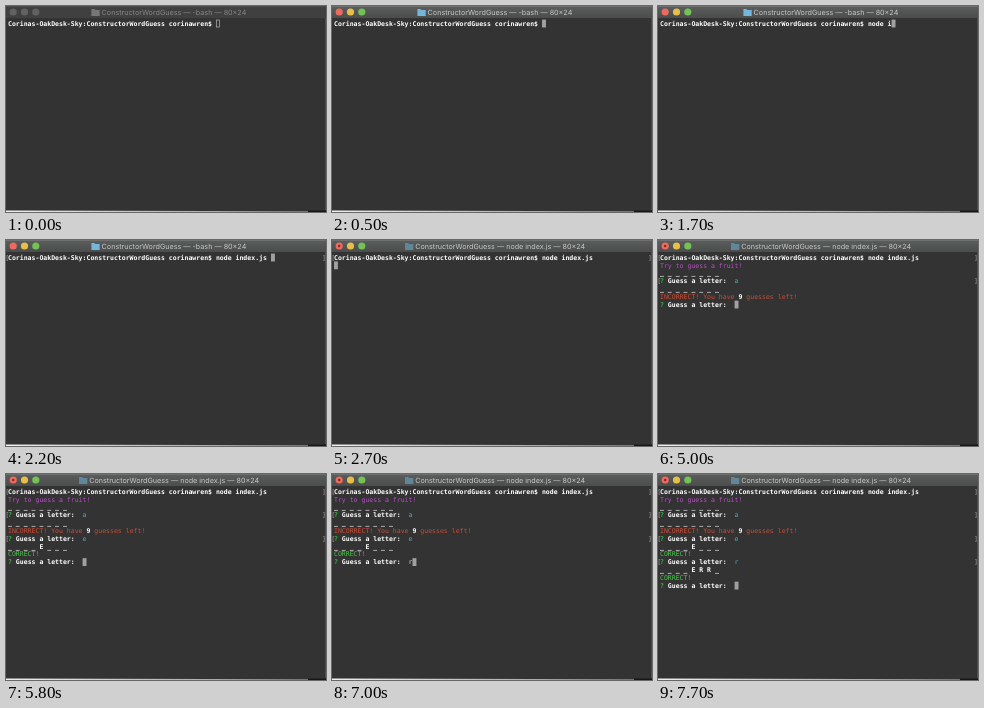
Animation, 320 px wide and 206 px high, one loop 8000 ms. Source, as an HTML page:

```html
<!DOCTYPE html>
<html lang="en">
<head>
<meta charset="utf-8">
<title>Word guess terminal</title>
<style>
  html, body { margin: 0; width: 100%; height: 100%; overflow: hidden; background: #333; }
  svg { display: block; width: 320px; height: 206px; }
  text { white-space: pre; text-rendering: geometricPrecision; }
  .term { font: 6.52px "DejaVu Sans Mono", monospace; }
  .title { font: 7.2px Inter, sans-serif; }
  .white { fill: #fff; font-weight: bold; }
  .plain { fill: #e4e4e4; }
  .ask { fill: #35b83a; font-weight: bold; }
  .magenta { fill: #bd4bc8; }
  .red { fill: #cf4a33; }
  .green { fill: #45c945; }
  .cyan { fill: #3fb4bf; }
  .mark { fill: #a0a0a0; }
</style>
</head>
<body>
<svg viewBox="0 0 320 206">
  <defs>
    <linearGradient id="bar" x2="0" y2="1">
      <stop stop-color="#5c5e5d"/><stop offset="1" stop-color="#4a4d4c"/>
    </linearGradient>
    <linearGradient id="edge">
      <stop stop-color="#f0f0f0"/><stop offset="1" stop-color="#8a8a8a"/>
    </linearGradient>
  </defs>
  <g id="stage"></g>
</svg>
<script>
const LOOP = 8000, LEFT = 2, TOP = 13.6, CELL = 6.52 * 0.602, LINE = 7.84;
const PROMPT = 'Corinas-OakDesk-Sky:ConstructorWordGuess corinawren$ ';
const TYPING = [[0, ''], [1100, 'no'], [1200, 'nod'], [1400, 'node'], [1500, 'node '],
  [1700, 'node i'], [1900, 'node in'], [2200, 'node index.js ']];
const ROUNDS = [
  { typed: 4000, enter: 4200, letter: 'a', word: '_ _ _ _ _ _ _ _',
    result: [['INCORRECT! You have ', 'red'], ['9', 'white'], [' guesses left!', 'red']] },
  { typed: 5500, enter: 5600, letter: 'e', word: '_ _ _ _ E _ _ _', result: [['CORRECT!', 'green']] },
  { typed: 7000, enter: 7300, letter: 'r', word: '_ _ _ _ E R R _', result: [['CORRECT!', 'green']] }
];
const stage = document.getElementById('stage');

const rect = (x, y, w, h, fill, more = '') =>
  `<rect x="${x}" y="${y}" width="${w}" height="${h}" fill="${fill}" ${more}/>`;
const dot = (x, r, fill) => `<circle cx="${x}" cy="6" r="${r}" fill="${fill}"/>`;
const text = (x, y, spans, style = 'term') => `<text x="${x}" y="${y}" class="${style}">` +
  spans.map(([s, cls]) => `<tspan class="${cls}">${s}</tspan>`).join('') + '</text>';

// Each row is { spans, mark }; marked rows carry the grey brackets.
function rowsAt(t) {
  const command = TYPING.filter(([at]) => at <= t).pop()[1];
  const rows = [{ spans: [[PROMPT + command, 'white']], mark: t >= 2200 }];
  if (t < 2600) return rows;
  if (t < 3000) return [...rows, { spans: [] }];
  rows.push({ spans: [['Try to guess a fruit!', 'magenta']] },
            { spans: [['_ _ _ _ _ _ _ _', 'white']] });
  for (const r of ROUNDS) {
    const done = t >= r.enter;
    const spans = [['? ', 'ask'], ['Guess a letter:  ', 'white']];
    if (t >= r.typed) spans.push([r.letter, done ? 'cyan' : 'plain']);
    rows.push({ spans, mark: done });
    if (!done) return rows;
    rows.push({ spans: [[r.word, 'white']] }, { spans: r.result });
  }
  rows.push({ spans: [['? ', 'ask'], ['Guess a letter:  ', 'white']] });
  return rows;
}

function titleBar(t, active) {
  const running = t >= 2600, x = running ? 73 : 85.4;
  const folder = !active ? '#777' : running ? '#5f8799' : '#74b6da';
  const lights = active ? ['#ec6a5e', '#e6bf48', '#72c254'] : ['#626262', '#626262', '#626262'];
  return rect(0, 0, 320, 12, active ? 'url(#bar)' : '#404040') +
    rect(0, 0, 320, 0.7, active ? '#777' : '#555') +
    lights.map((c, i) => dot(7.2 + i * 11.3, 3.6, c)).join('') +
    (running ? dot(7.2, 1.2, '#7c2a24') : '') +
    `<path d="M${x} 3h3l1 1h4.3v6h-8.3z" fill="${folder}"/>` +
    `<text x="${x + 10.2}" y="8.8" class="title" fill="${active ? '#c6c8c7' : '#858585'}">` +
    `ConstructorWordGuess — ${running ? 'node index.js' : '-bash'} — 80×24</text>`;
}

// Light lower rim, and the dark backdrop at the right.
const frame = rect(302, 204.6, 18, 1.4, '#161616') + rect(319.3, 12, 0.7, 192, '#5a5a5a') +
  '<path d="M0 204.4L302 205.2V206H0z" fill="url(#edge)"/>';

function cursor(rows, active) {
  const col = rows[rows.length - 1].spans.reduce((n, [s]) => n + s.length, 0);
  const x = LEFT + col * CELL, y = TOP + (rows.length - 1) * LINE;
  return active ? rect(x, y, CELL, LINE, '#a0a0a0')
    : rect(x + 0.4, y + 0.4, CELL - 0.8, LINE - 0.8, 'none', 'stroke="#a0a0a0" stroke-width=".8"');
}

function scene(t) {
  const active = t >= 400, rows = rowsAt(t);
  return rect(0, 0, 320, 206, '#333') + titleBar(t, active) + frame + cursor(rows, active) +
    rows.map(({ spans, mark }, i) => {
      const y = TOP + 6.1 + i * LINE;
      return text(LEFT, y, spans) +
        (mark ? text(-0.8, y, [['[', 'mark']]) + text(316, y, [[']', 'mark']]) : '');
    }).join('');
}

let shown = '';
function draw(now) {
  const next = scene(now % LOOP);
  if (next !== shown) stage.innerHTML = shown = next;
  requestAnimationFrame(draw);
}
draw(performance.now());
</script>
</body>
</html>
```
